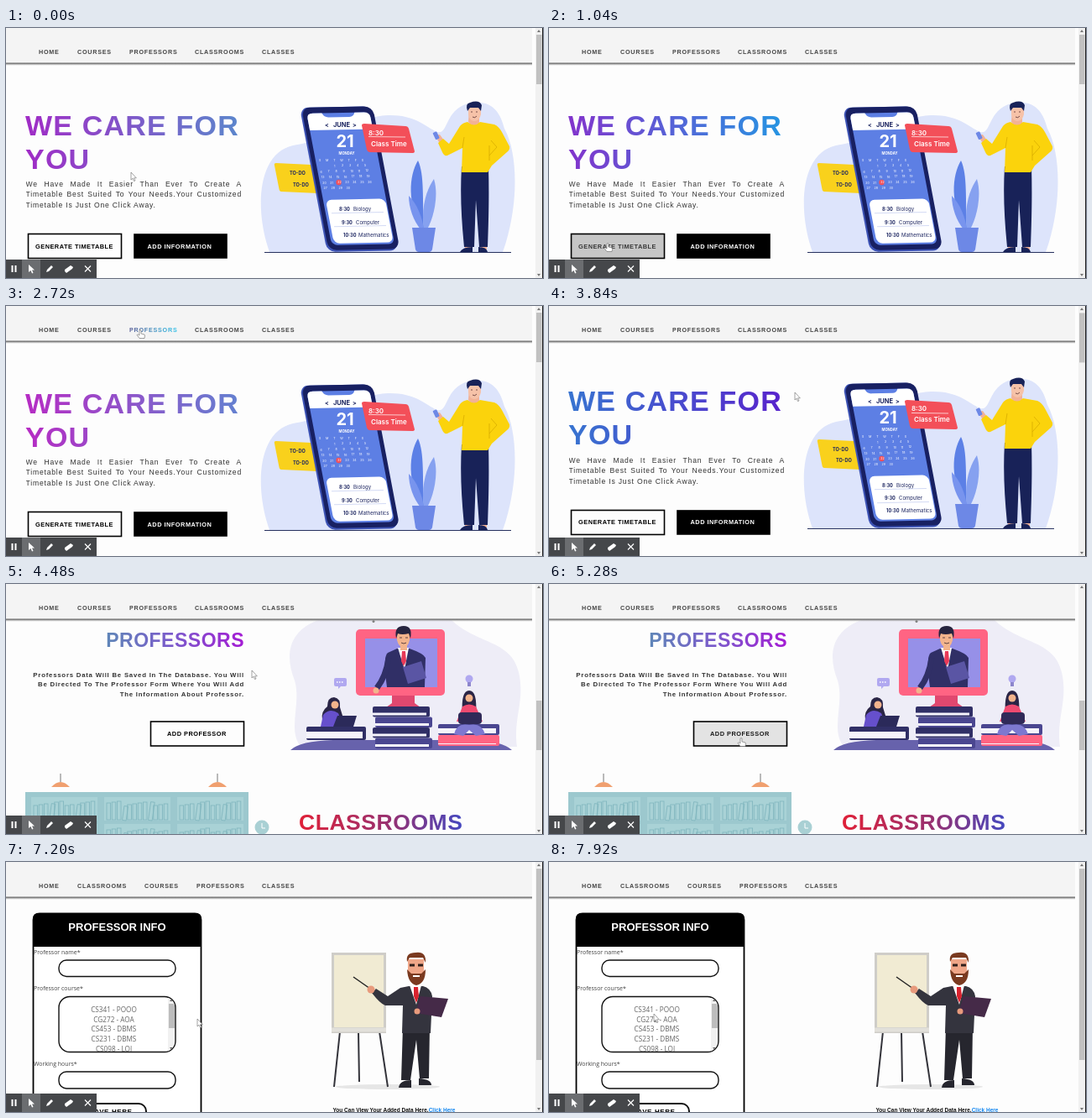
Animation, 640 px wide and 298 px high, one loop 8 s. Source, as an HTML page:

```html
<!DOCTYPE html>
<html lang="en">
<head>
<meta charset="utf-8">
<title>Timetable</title>
<style>
html,body{margin:0;width:100%;height:100%;overflow:hidden;background:#fdfdfd}
svg{display:block;width:640px;height:298px}
text,p{font-family:"Liberation Sans",Arial,sans-serif;white-space:pre}
.b{font-weight:700}
.mid{text-anchor:middle}
.end{text-anchor:end}
.nav text{font-weight:700;font-size:7.2px;letter-spacing:.75px;fill:#444}
.btn text{font-weight:700;font-size:7.4px;letter-spacing:.48px}
.btn rect{stroke:#000;stroke-width:1.6}
.app text{font-family:Inter,"Open Sans",sans-serif}
.lab text{font-family:"Open Sans","Noto Sans",sans-serif;font-size:7px;fill:#444}
.opt text{font-family:"Open Sans","Noto Sans",sans-serif;font-size:8.2px;fill:#666;text-anchor:middle}
.note text{font-weight:700;font-size:7.8px;letter-spacing:.77px;fill:#333;text-anchor:end}
p{margin:0;white-space:normal;text-align:justify;font-size:8.6px;line-height:12.8px;letter-spacing:.8px;color:#333}
</style>
</head>
<body>
<svg viewBox="0 0 640 298">
<defs>
  <linearGradient id="hero" gradientUnits="userSpaceOnUse" x1="24" x2="277" y1="0" y2="0"><stop/><stop offset="1"/></linearGradient>
  <linearGradient id="prof"><stop stop-color="#5f86b8"/><stop offset=".5" stop-color="#7c58cc"/><stop offset="1" stop-color="#a41cd4"/></linearGradient>
  <linearGradient id="room"><stop stop-color="#e02038"/><stop offset=".55" stop-color="#983070"/><stop offset="1" stop-color="#4448c0"/></linearGradient>
  <linearGradient id="hot"><stop stop-color="#5a5f98"/><stop offset="1" stop-color="#35c4ea"/></linearGradient>
  <linearGradient id="shade" x2="0" y2="1"><stop stop-color="#f4f4f4"/><stop offset=".4" stop-color="#707070"/><stop offset="1" stop-color="#ccc" stop-opacity="0"/></linearGradient>
  <clipPath id="screen"><rect x="428" y="44" width="86" height="79"/></clipPath>
  <clipPath id="list"><rect x="64" y="161" width="137" height="65" rx="12"/></clipPath>
</defs>
<rect width="640" height="298" fill="#fdfdfd"/>

<g id="home">
  <!-- hero -->
  <g class="b" font-size="34" letter-spacing="1.2" fill="url(#hero)">
    <text x="23" y="127.5">WE CARE FOR</text><text x="23" y="167.5">YOU</text>
  </g>
  <foreignObject x="23.5" y="179.6" width="257.5" height="42"><p>We Have Made It Easier Than Ever To Create A Timetable Best Suited To Your Needs.Your Customized Timetable Is Just One Click Away.</p></foreignObject>
  <g class="btn" id="gen"><rect x="26.5" y="245.5" width="111" height="29"/><text x="35" y="262.5">GENERATE TIMETABLE</text></g>
  <g class="btn"><rect x="153" y="246" width="110" height="28"/><text x="168.5" y="262.5" fill="#fff">ADD INFORMATION</text></g>

  <g class="app">
    <path fill="#dde4fb" d="M314 267C297 220 298 150 342 140C395 132 420 105 455 104C488 103 500 118 514 124C528 128 522 94 556 89C582 86 590 104 594 120C611 150 611 215 592 267Z"/>
    <path d="M308 267.5H602" stroke="#26305e"/>
    <path fill="#f9d11c" d="M322 161L364 163L372 197L328 195Q326 195 325.500 192L320 164Q319 161 322 161Z"/>
    <g transform="matrix(1 -.02 .19 1 352 95)">
      <rect x="-2" width="85" height="172" rx="10" fill="#3d53b5"/>
      <rect width="85" height="170" rx="10" fill="#182062"/>
      <rect x="5" y="7" width="75" height="157" rx="7" fill="#5d7fe4"/>
      <path fill="#fff" d="M5 27V13Q5 7 12 7H23Q25 12 30 12H55Q60 12 62 7H73Q80 7 80 13V27Z"/>
      <rect x="8" y="110" width="71" height="52" rx="7" fill="#fff"/>
      <path d="M12 126H74M12 142H74" stroke="#b9c5ee" stroke-width=".6"/>
    </g>
    <g class="b" fill="#1c2560">
      <text x="400" y="118" font-size="7.5" class="mid">JUNE</text>
      <text x="380" y="118" font-size="7">&lt;</text><text x="413" y="118" font-size="7">&gt;</text>
      <text x="404" y="142" font-size="20" fill="#fff" class="mid">21</text>
      <text x="406" y="151" font-size="4.2" fill="#fff" class="mid">MONDAY</text>
    </g>
    <circle cx="396.500" cy="184" r="3.2" fill="#f2505a"/>
    <g id="days" font-size="3.6" fill="#fff"></g>
    <g font-size="6" fill="#1c2560">
      <g class="b" font-size="5.600"><text x="397" y="218">8:30</text><text x="400" y="233.500">9:30</text><text x="402" y="248.500">10:30</text>
      <text x="338" y="175">TO-DO</text><text x="342" y="188.500">TO-DO</text></g>
      <text x="414" y="218">Biology</text><text x="417" y="233.500">Computer</text><text x="420" y="248.500">Mathematics</text>
    </g>
    <path fill="#f34f59" d="M427 114L476 117Q479 117 480 120L487 147Q487 149 484 149L433 148Q431 148 430 145L424 116Q424 114 427 114Z"/>
    <path d="M432 129.500L476 130" stroke="#fff" stroke-width=".7"/>
    <g fill="#fff" font-size="8" font-weight="600"><text x="432" y="127.500">8:30</text><text x="435" y="140.500">Class Time</text></g>
    <g fill="#5c80e6">
      <path d="M496 240C478 210 480 176 491 158C499 175 496 205 498 240Z"/>
      <path fill="#86a1f0" d="M498 240C494 210 503 190 510 180C516 200 510 225 502 240Z"/>
      <path fill="#7894ee" d="M494 240C486 230 480 215 480 200C490 210 496 225 498 240Z"/>
      <path fill="#6d88e6" d="M484 238H512L508 264Q507 267 504 267H492Q489 267 488 264Z"/>
    </g>
    <g>
      <path fill="#f2b296" d="M552 98H564V114L557 120L551 112ZM547 256H556V264H547ZM566 256H573V264H566Z"/>
      <path fill="#f2b296" d="M511 128L517 127L522 134L518 139Z"/>
      <rect x="510" y="124" width="5" height="9" rx="1" transform="rotate(-25 512 128)" fill="#6d88e6"/>
      <path fill="#182258" d="M543 165H575C576 200 575 235 574 261H564L560 205L558 261H546C543 230 541 200 543 165ZM541 267Q544 261 556 261V267ZM563 267V261Q573 261 574 267Z"/>
      <path fill="#fbd30c" d="M550 112Q558 119 565 112L582 115Q587 117 591 124L600 141Q601 145 597 148L579 164L574 172H543L544 143L526 152Q522 153 520 148L515 137L521 132L528 138L541 117Q544 113 550 112Z"/>
      <path fill="none" stroke="#d9ac00" stroke-width=".8" d="M544 143L546 130M576 158V140M576 152L585 142L578 134"/>
      <path fill="#f6c2a8" d="M551 95H566V103Q564 111 558 111Q552 110 551 103Z"/>
      <path fill="#182258" d="M550 99Q547 90 553 89Q564 85 567 92L566 99L563 95H553Z"/>
      <path d="M554 100H556M560 100H562M556 106Q559 108 561 105" stroke="#5a3030" fill="none" stroke-width=".8"/>
    </g>
  </g>

  <!-- professors and classrooms -->
  <g transform="translate(0 670)">
    <text class="b end" x="284" y="75" font-size="23" letter-spacing=".5" fill="url(#prof)">PROFESSORS</text>
    <g class="note"><text x="284" y="110.800">Professors Data Will Be Saved In The Database. You Will</text><text x="284" y="122.300">Be Directed To The Professor Form Where You Will Add</text><text x="284" y="133.800">The Information About Professor.</text></g>
    <g class="btn" id="add"><rect x="172.500" y="164" width="111" height="29"/><text x="192" y="181">ADD PROFESSOR</text></g>
    <path fill="#eeedf7" d="M350 192C336 172 352 142 344 115C332 85 336 55 375 42H530C560 72 602 66 611 105C619 140 604 160 609 194Z"/>
    <path fill="#6762ac" d="M339 198Q350 187 390 186H555Q592 187 603 198Z"/>
    <path fill="#e0486f" d="M460 132H487V142L494 147H453L460 142Z"/>
    <rect x="417" y="54" width="106" height="79" rx="5" fill="#ff6483"/>
    <rect x="428" y="65" width="86" height="58" fill="#9690e8"/>
    <g clip-path="url(#screen)">
      <path fill="#302f66" d="M466 77L455 82Q449 86 454 123H499L500 88Q498 83 481 77Z"/>
      <path fill="#fff" d="M467 76H480L475 102Z"/><path fill="#e83a58" d="M472 80H476L477 92L474 98L471 92Z"/>
    </g>
    <path d="M456 88Q453 110 442 124" fill="none" stroke="#302f66" stroke-width="7"/>
    <circle cx="441" cy="127" r="3.500" fill="#f3b48c"/>
    <path fill="#5a55a4" d="M473 99L495 92L501 112L479 119Z"/>
    <path fill="#f3b48c" d="M466 57H481V67Q479 75 474 76Q468 75 466 67ZM470 72H478V79H470Z"/>
    <path fill="#262440" d="M465 65Q462 50 474 50Q485 50 482 65L480 59Q472 61 467 59Z"/>
    <path d="M469 64H472M476 64H479M471 70Q474 72 477 70" stroke="#3a2830" fill="none" stroke-width=".8"/>
    <circle cx="438" cy="44.500" r="1.500" fill="#777"/>
    <g id="books"></g>
    <path fill="#2a2546" d="M377 162Q375 152 383 146Q383 135 391 135Q399 136 398 147L402 160Z"/>
    <circle cx="392" cy="144" r="4.500" fill="#f3b48c"/>
    <path fill="#6650cc" d="M378 156Q386 147 396 154L402 170H375Z"/>
    <path fill="#2b2a5a" d="M395 157H418L414 170H390Z"/>
    <path fill="#2a2546" d="M544 155Q542 127 552 127Q562 127 560 155Z"/>
    <circle cx="552" cy="136" r="4.500" fill="#f3b48c"/>
    <path fill="#ef4a70" d="M544 146Q552 141 560 146L568 164H537Z"/>
    <path fill="#7d78d0" d="M534 179Q537 165 552 168Q567 165 571 179L560 181L552 174L545 181Z"/>
    <rect x="539" y="153" width="28" height="14" rx="4" fill="#302a58"/>
    <path fill="#b0a8f0" d="M393 112H404Q406 112 406 114V120Q406 122 404 122H399L396 125V122H393Q391 122 391 120V114Q391 112 393 112Z"/>
    <path d="M394 117H403" stroke="#fff" stroke-width="1.500" stroke-dasharray="1.500"/>
    <circle cx="552" cy="113" r="4.500" fill="#b0a8f0"/><rect x="550" y="117" width="4" height="5" fill="#8d86cc"/>
    <g id="case"></g>
    <circle cx="305" cy="290" r="8.500" fill="#a9d0d4"/><path d="M305 285V291H309" fill="none" stroke="#fff"/>
    <text class="b" x="349" y="293" font-size="26.500" letter-spacing=".55" fill="url(#room)">CLASSROOMS</text>
  </g>
</g>

<g id="form">
  <path fill="#fff" stroke="#000" stroke-width="1.800" d="M32.500 310V69Q32.500 61.500 40 61.500H225Q232.500 61.500 232.500 69V310"/>
  <path d="M32 101V69Q32 61 40 61H225Q233 61 233 69V101Z"/>
  <text class="b mid" x="132.500" y="81.500" font-size="13" fill="#fff">PROFESSOR INFO</text>
  <g class="lab"><text x="33" y="109.500">Professor name*</text><text x="33" y="152.500">Professor course*</text><text x="33" y="242.500">Working hours*</text></g>
  <g fill="#fff" stroke="#111" stroke-width="1.400"><rect x="63" y="117" width="139" height="19.500" rx="9"/><rect x="63" y="160.500" width="139" height="66" rx="13"/><rect x="63" y="250" width="139" height="20" rx="9"/><rect x="84" y="288" width="83" height="24" rx="9" stroke-width="2"/></g>
  <g class="opt" clip-path="url(#list)"><rect x="193" y="161" width="9" height="66" fill="#f1f1f1"/><rect x="194" y="169" width="7" height="29" fill="#bdbdbd"/><path fill="#666" d="M195 166L197.500 163L200 166ZM195 221L197.500 224L200 221Z"/></g>
  <text class="b mid" x="125" y="300" font-size="8" letter-spacing=".6">SAVE HERE</text>
  <ellipse cx="455" cy="268" rx="62" ry="3" fill="#e6e6e6"/>
  <path d="M398 202L391 268M420 202L421 262M445 202L455 268" stroke="#33333a" stroke-width="2"/>
  <rect x="388" y="108" width="65" height="96" fill="#cfcdc8"/><rect x="391" y="111" width="59" height="86" fill="#f1ebd3"/>
  <path d="M388 200H453" stroke="#e2e0da" stroke-width="5"/>
  <path fill="#26262e" d="M473 196H505L504 258H493L489 212L482 260H471ZM468 269Q469 260 483 260V269ZM492 266V258Q507 259 507 266Z"/>
  <path fill="#34343e" d="M480 148H497Q506 150 508 160L506 204H472L473 171L452 171Q446 169 436 156L441 151L455 160L470 150Z"/>
  <path fill="#fff" d="M481 147H495L489 170Z"/><path fill="#d8222e" d="M486 149H491L492 160L489 168L486 160Z"/>
  <path d="M414 137L434 151" stroke="#222" stroke-width="1.500"/><circle cx="435" cy="152" r="4.500" fill="#e89a7c"/>
  <path fill="#452a48" d="M494 160L527 163L519 185L488 180Z"/><circle cx="490" cy="178" r="3.500" fill="#e89a7c"/>
  <path fill="#efa688" d="M479 116H498V131Q496 143 489 144Q481 142 479 131Z"/>
  <path fill="#7a3a20" d="M478 119Q476 108 488 108Q501 106 500 120L497 114H481ZM478 128L483 133H495L500 128Q500 145 489 147Q479 145 478 128Z"/>
  <path d="M481 123H487M491 123H497" stroke="#30201c" stroke-width="3"/><path d="M485 136H493" stroke="#fff" stroke-width="2"/>
  <text class="b" x="389.500" y="297.500" font-size="6.500" fill="#111">You Can View Your Added Data Here.<tspan fill="#1688f0">Click Here</tspan></text>
</g>

<rect width="627" height="41" fill="#f4f4f4"/>
<rect y="40.500" width="627" height="4.500" fill="url(#shade)"/>
<g class="nav" id="nav"></g>
<rect x="631" width="8" height="298" fill="#f1f1f1"/>
<path fill="#777" d="M633 5L635 2L637 5ZM633 293L635 296L637 293Z"/>
<rect id="thumb" x="632" width="6.500" fill="#c1c1c1"/>
<rect x="639" width="1" height="298" fill="#222"/>

<!-- recorder bar -->
<g>
  <rect y="276" width="108" height="22" fill="#45474a"/><rect x="19" y="276" width="22" height="22" fill="#6b6d70"/>
  <g fill="#fff"><path d="M6.500 283H8.500V291H6.500ZM10.500 283H12.500V291H10.500Z"/><path d="M27 282V291L29.500 289L31 292.500L32.500 292L31 288.500H34Z"/>
  <path d="M48 291L49 288L54 283L56 285L51 290ZM70 288L77 283L80 285L79 287L72 292L70 290Z"/></g>
  <path d="M94 283.500L101 290.500M101 283.500L94 290.500" stroke="#fff" stroke-width="1.200"/>
</g>
<g id="cursor" stroke="#666" stroke-width=".6" fill="#fff">
  <path d="M0 0V9L2 7.200L3.500 10.500L5 10L3.500 6.800H6.300Z"/>
  <path d="M-1 0Q0-1 1 0V4L5 5Q6 6 5 9.500H-1L-4 5.500Q-3 4-1 6Z"/>
</g>
</svg>
<script>
const LOOP = 8000, TOP = 670, FORM_AT = 7200;
const $ = id => document.getElementById(id);
const clamp = v => Math.max(0, Math.min(1, v));
const mix = (a, b, k) => a + (b - a) * k;
const ease = k => k < .5 ? 4 * k ** 3 : 1 - (2 - 2 * k) ** 3 / 2;

function add(parent, tag, attrs, text) {
  const el = document.createElementNS("http://www.w3.org/2000/svg", tag);
  for (const k in attrs) el.setAttribute(k, attrs[k]);
  if (text !== undefined) el.textContent = text;
  parent.appendChild(el);
  return el;
}
const box = (g, x, y, width, height, fill, rx = 0) => add(g, "rect", {x, y, width, height, fill, rx});

// calendar
for (let d = 1; d <= 30; d++) {
  const c = (d + 1) % 7, r = Math.floor((d + 1) / 7);
  add($("days"), "text", {x: 373 + c * 9 + r * 1.4, y: 166 + r * 6.6 - c * .2}, d);
}
add($("days"), "text", {x: 373, y: 159, "letter-spacing": 5.8}, "SMTWTFS");

// book piles: a cover with a strip of pages
function book(x, y, w, h, fill, pages) {
  box($("books"), x, y, w, h, fill, 2);
  box($("books"), x, y + h - pages - 2, w - 4, pages, "#f6f4fb");
}
for (let i = 0; i < 4; i++) book(437 + i % 2 * 3, 146 + i * 12.5, 68, 12.5, i % 2 ? "#4a4690" : "#302f66", 3);
book(358, 170, 71, 16, "#302f66", 8);
book(515, 167, 73, 13, "#4a4690", 6);
book(515, 180, 73, 13, "#ff6483", 1);

// bookcase with lamps
const shelf = $("case");
for (const x of [65, 252]) {
  add(shelf, "path", {d: `M${x} 226V236`, stroke: "#777"});
  add(shelf, "path", {d: `M${x - 11} 242Q${x} 230 ${x + 11} 242Z`, fill: "#f0a070"});
}
box(shelf, 23, 248, 266, 80, "#9cc8ce");
for (let c = 0; c < 3; c++) {
  const left = 30 + c * 87;
  for (const top of [254, 286]) {
    box(shelf, left, top, 79, 28, "#a9d2d6");
    for (let i = 0; i < 12; i++) {
      const h = 17 + (i * 7 + c * 3) % 6;
      add(shelf, "rect", {x: left + 3 + i * 6.2, y: top + 27 - h, width: 4.6, height: h, fill: "none",
        stroke: "#7fb5bd", "stroke-width": .8, transform: i % 5 == 3 ? `rotate(8 ${left + i * 6.2} ${top + 27})` : ""});
    }
  }
}

const options = document.querySelector(".opt");
["CS341 - POOO", "CG272 - AOA", "CS453 - DBMS", "CS231 - DBMS", "CS098 - LOJ"]
  .forEach((s, i) => add(options, "text", {x: 128.5, y: 179 + i * 11.7}, s));

const menus = [
  [["HOME", 39], ["COURSES", 85], ["PROFESSORS", 147], ["CLASSROOMS", 225], ["CLASSES", 305]],
  [["HOME", 39], ["CLASSROOMS", 85], ["COURSES", 165], ["PROFESSORS", 227], ["CLASSES", 305]]
];
const links = menus[0].map(() => add($("nav"), "text", {y: 31}));

// time, x, y
const path = [[0, 149, 172], [80, 149, 172], [400, 112, 212], [560, 112, 212], [900, 70, 257], [1280, 70, 257],
  [1360, 72, 240], [1440, 72, 230], [2080, 52, 29], [2320, 52, 29], [2480, 105, 29], [2680, 160, 29],
  [2760, 160, 29], [2920, 250, 29], [3120, 322, 29], [3200, 322, 29], [3520, 293, 103], [4960, 293, 103],
  [5230, 229, 184], [5760, 229, 184], [5900, 226, 188], [6720, 226, 188], [7040, 228, 187], [7280, 228, 187], [7860, 125, 181]];
// time, left rgb, right rgb of the headline
const tint = [[0, 160, 44, 198, 92, 134, 204], [1040, 130, 52, 204, 38, 148, 226], [2000, 60, 110, 214, 130, 60, 205],
  [2720, 182, 44, 196, 100, 128, 208], [3840, 56, 116, 208, 88, 36, 204], [8000, 160, 44, 198, 92, 134, 204]];

function sample(table, t, fn = k => k) {
  const i = table.findIndex(row => row[0] > t);
  if (i < 0) return table[table.length - 1].slice(1);
  const a = table[i - 1], b = table[i], k = fn((t - a[0]) / (b[0] - a[0]));
  return a.slice(1).map((v, j) => mix(v, b[j + 1], k));
}

function button(id, k) {
  const [rect, label] = $(id).children, v = Math.round(255 * k);
  rect.setAttribute("fill", `rgba(0,0,0,${k})`);
  label.setAttribute("fill", `rgb(${v},${v},${v})`);
}

function draw(t) {
  const onForm = t >= FORM_AT;
  const scroll = TOP * ease(clamp((t - 3800) / 450));
  const [x, y] = sample(path, t, k => k * k * (3 - 2 * k));
  $("home").style.display = onForm ? "none" : "";
  $("form").style.display = onForm ? "" : "none";
  $("home").setAttribute("transform", `translate(0 ${-scroll})`);
  $("thumb").setAttribute("y", onForm ? 8 : 8 + 131 * scroll / TOP);
  $("thumb").setAttribute("height", onForm ? 228 : 59);

  const c = sample(tint, t), stops = $("hero").children;
  stops[0].setAttribute("stop-color", `rgb(${c.slice(0, 3)})`);
  stops[1].setAttribute("stop-color", `rgb(${c.slice(3)})`);

  let hand = false;
  menus[+onForm].forEach(([name, left], i) => {
    const over = y < 36 && x > left - 3 && x < left + name.length * 6;
    hand = hand || over;
    links[i].textContent = name;
    links[i].setAttribute("x", left);
    links[i].style.fill = over ? "url(#hot)" : "";
  });

  button("gen", clamp((t - 975) / 300) * (1 - clamp((t - 1330) / 300)));
  button("add", clamp((t - 5250) / 300));
  hand = hand || (t > 860 && t < 1340) || (t > 5180 && t < FORM_AT);
  const [arrow, finger] = $("cursor").children;
  arrow.style.display = hand ? "none" : "";
  finger.style.display = hand ? "" : "none";
  $("cursor").setAttribute("transform", `translate(${x} ${y})`);
}

function tick() {
  draw(performance.now() % LOOP);
  requestAnimationFrame(tick);
}
tick();
</script>
</body>
</html>
```
